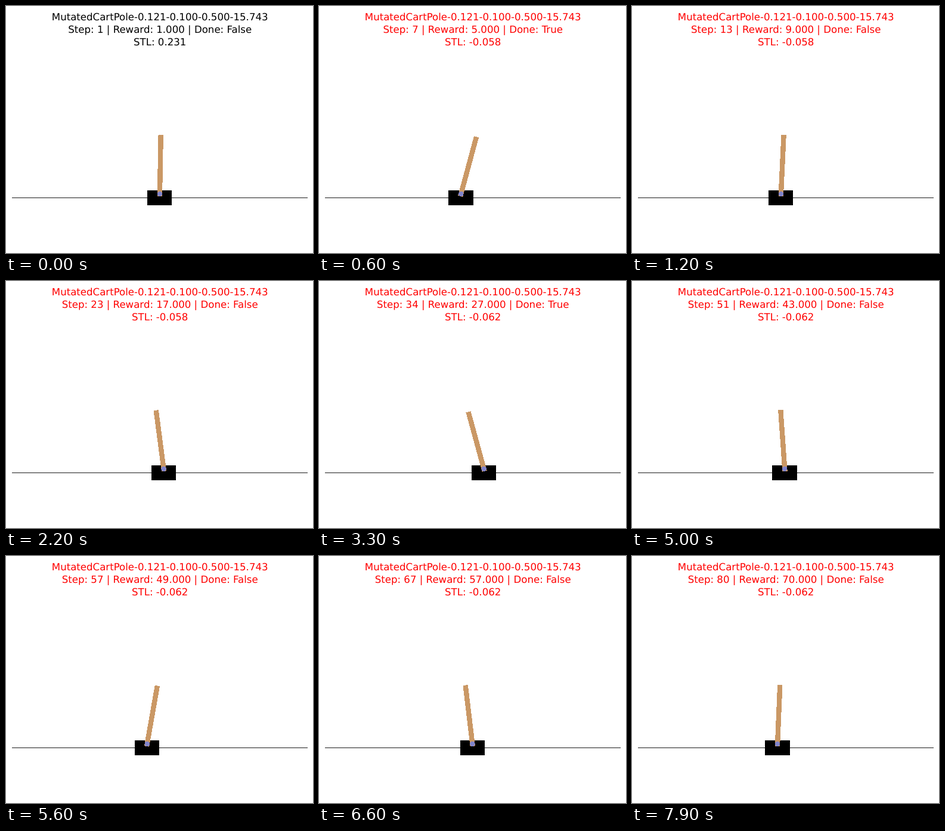
These frames come from a looping animation (515x414 px, 8000 ms). An HTML page:

```html
<!DOCTYPE html>
<html lang="en">
<head>
<meta charset="utf-8">
<title>Cart pole</title>
<style>
  html, body { margin: 0; width: 100%; height: 100%; overflow: hidden; background: #fff; }
  svg { display: block; width: 515px; height: 414px; shape-rendering: crispEdges; }
  text {
    font: 16.6px "DejaVu Sans", sans-serif;
    text-anchor: middle;
    text-rendering: geometricPrecision;
  }
</style>
</head>
<body>
<svg viewBox="0 0 515 414">
  <g id="title">
    <text x="258.2" y="24">MutatedCartPole-0.121-0.100-0.500-15.743</text>
    <text x="258.2" y="45" id="status"></text>
    <text x="258.2" y="66" id="robustness"></text>
  </g>
  <rect x="10" y="321" width="495.5" height="1" fill="#1c1c1c"/>
  <g id="cart">
    <rect x="-20.6" y="309" width="41.25" height="24.6"/>
    <g id="pole">
      <rect x="-4" y="-99" width="8.4" height="103.1" fill="#ca9865"/>
      <circle cx=".2" r="4.2" fill="#8184cb"/>
    </g>
  </g>
</svg>
<script>
const STEPS = 80, STEP_MS = 100;
const RAD = Math.PI / 180;
const LIMIT = 12;         // degrees of lean that count as a failure
const HALF_SWING = 10;    // steps in one sway to a side, roughly
const PIVOT_DIST = 69;    // height on the pole that hardly moves as the cart swings

// Key poses: step, pole angle in degrees, pivot x, sway on the way to the next pose
const poses = [
  [1, 1, 259, 13.25],
  [13, 2.7, 253, -12.2],
  [34, -15.3, 258.2, 6],
  [44, 7.5, 254.6, -13],
  [57, 10, 248.5, 7],
  [67, -6.8, 249, 9],
  [80, 2.4, 246.8, 0]
];

function pose(step) {
  const i = Math.max(1, poses.findIndex(p => p[0] >= step));
  const [s0, angle0, pivot0, sway] = poses[i - 1];
  const [s1, angle1, pivot1] = poses[i];
  const u = (step - s0) / (s1 - s0);
  const eased = (1 - Math.cos(Math.PI * u)) / 2;
  const sways = Math.round((s1 - s0) / HALF_SWING);
  const angle = angle0 + (angle1 - angle0) * eased + sway * Math.sin(Math.PI * sways * u);
  const pivot = pivot0 + (pivot1 - pivot0) * eased;
  return { angle, x: pivot - PIVOT_DIST * Math.sin(angle * RAD) };
}

// The first failure still earns a point; later failing steps earn none.
function simulate() {
  const states = [];
  let reward = 0, failed = false, stl = Infinity;
  for (let step = 1; step <= STEPS; step++) {
    const { angle, x } = pose(step);
    const done = Math.abs(angle) > LIMIT;
    if (!done || !failed) reward++;
    failed = failed || done;
    stl = Math.min(stl, 0.2515 - 1.174 * Math.abs(angle) * RAD);
    states.push({ step, angle, x, done, reward, stl });
  }
  return states;
}

const states = simulate();
const [title, status, robustness, cart, pole] =
  ["title", "status", "robustness", "cart", "pole"].map(id => document.getElementById(id));

function draw(now) {
  const s = states[Math.floor(now / STEP_MS) % STEPS];
  title.setAttribute("fill", s.stl < 0 ? "#f00" : "#000");
  status.textContent =
    `Step: ${s.step} | Reward: ${s.reward.toFixed(3)} | Done: ${s.done ? "True" : "False"}`;
  robustness.textContent = `STL: ${s.stl.toFixed(3)}`;
  cart.setAttribute("transform", `translate(${s.x} 0)`);
  pole.setAttribute("transform", `translate(0 314.9) rotate(${s.angle})`);
}

const start = performance.now();
function loop() {
  draw(performance.now() - start);
  requestAnimationFrame(loop);
}
loop();
</script>
</body>
</html>
```
